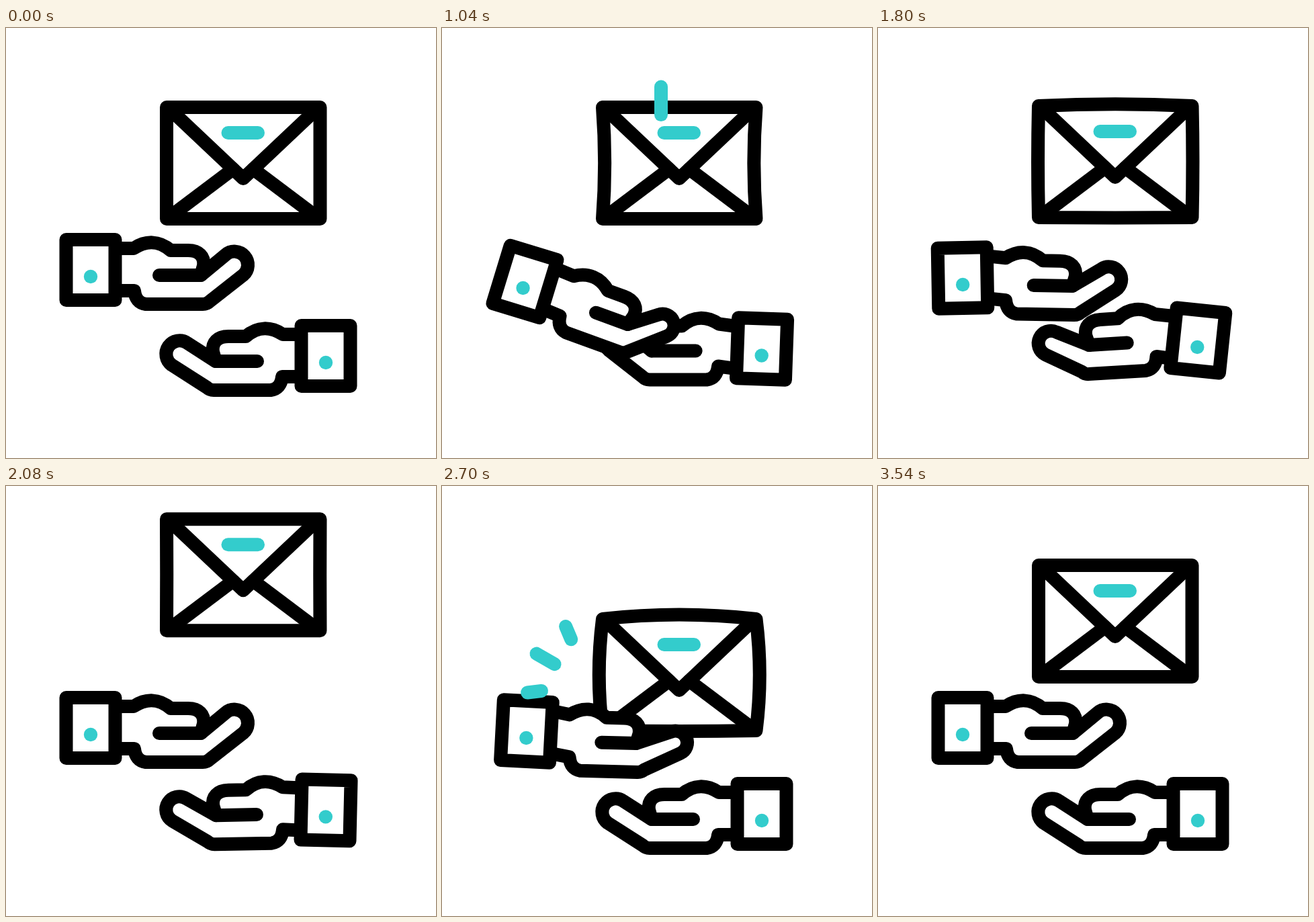
Recreate the animation shown at these times as an HTML page with a canvas. Size 640 by 640 pixels, loop 3600 ms.

```html
<!DOCTYPE html>
<html lang="en">
<head>
<meta charset="utf-8">
<title>Tossed letter</title>
<style>
  html, body { margin: 0; width: 100%; height: 100%; overflow: hidden; background: #fff; }
  canvas { display: block; width: 640px; height: 640px; }
</style>
</head>
<body>
<canvas id="stage" width="640" height="640"></canvas>
<script>
const LOOP = 3600, STEP = 20, TEAL = '#33cccc';
const ctx = document.getElementById('stage').getContext('2d');

// Key poses: time, cuff dy, cuff tilt, palm dy, palm bend, finger curl; omitted values are at rest
const LEFT = [
  [200],
  [560, -68.5, -26.5, -88, -3, 21],
  [1040, 17.5, 17, 73, 20, 19],
  [1500, 25, 8, 47, 7, 14],
  [1800, 12, -1, 16, 1, 7],
  [2080],
  [2360, 5.5, -2, 6.5],
  [2700, 5, 3, 15, 1.5, 17],
  [3060, -25, -14, -28, -3, 12],
  [3440]
];
const RIGHT = [
  [440],
  [720, 11, 3, 14, 1],
  [1040, -10.5, -2, -15.5, 0, -6],
  [1300, -31, -12, -33, 1, 5],
  [1800, -23, -6, -24, 3.5, 9],
  [2240]
];

// Envelope height: rest, catch and throw, two falls, settle
const FLIGHT = [
  [200, 0], [390, 25], [560, -33], [768, -78], [1040, 0], [1210, 112], [1340, 138],
  [1800, -2], [2067, -69], [2360, 12], [2580, 90], [2700, 80], [3200, -36], [3540, 0]
];

const rad = deg => deg * Math.PI / 180;
const clamp = p => Math.min(1, Math.max(0, p));
const smooth = p => { p = clamp(p); return p * p * (3 - 2 * p); };
const pulse = (t, from, to) => Math.sin(Math.PI * clamp((t - from) / (to - from)));

// Monotone spline through one column of the keys, held at both ends
function sample(keys, t, col = 1) {
  const last = keys.length - 1;
  const at = k => keys[k][col] || 0;
  if (t <= keys[0][0]) return at(0);
  if (t >= keys[last][0]) return at(last);
  const span = k => keys[k + 1][0] - keys[k][0];
  const slope = k => (at(k + 1) - at(k)) / span(k);
  const tangent = k => {
    if (k === 0 || k === last) return 0;
    const a = slope(k - 1), b = slope(k);
    return a * b <= 0 ? 0 : (a * span(k) + b * span(k - 1)) / (span(k - 1) + span(k));
  };
  const i = keys.findIndex(k => k[0] > t) - 1;
  const u = (t - keys[i][0]) / span(i), w = 1 - u;
  return at(i) + (at(i + 1) - at(i)) * smooth(u)
    + span(i) * u * w * (tangent(i) * w - tangent(i + 1) * u);
}

// Maps local coordinates to the stage
function frame(x, y, deg) {
  const c = Math.cos(rad(deg)), s = Math.sin(rad(deg));
  return (px, py) => [x + px * c - py * s, y + px * s + py * c];
}

function line(color, ...pts) {
  ctx.strokeStyle = color;
  ctx.beginPath();
  pts.forEach(p => ctx.lineTo(...p));
  ctx.stroke();
}

function paint() {
  ctx.fillStyle = '#fff';
  ctx.strokeStyle = '#000';
  ctx.fill();
  ctx.stroke();
}

function drawEnvelope(t) {
  const l = 239, r = 467.5, top = 118, low = 284, mx = 353, my = 201;
  const speed = Math.abs(sample(FLIGHT, t + 10) - sample(FLIGHT, t - 10)) / 20;
  const squash = pulse(t, 1210, 1900) + pulse(t, 2470, 2900);
  const side = 6 * speed - 6 * squash, bow = 6.5 * squash;

  ctx.save();
  ctx.translate(0, sample(FLIGHT, t));
  ctx.beginPath();
  ctx.moveTo(l, top);
  ctx.quadraticCurveTo(mx, top - 2 * bow, r, top);
  ctx.quadraticCurveTo(r - 2 * side, my, r, low);
  ctx.quadraticCurveTo(mx, low + bow / 3, l, low);
  ctx.quadraticCurveTo(l + 2 * side, my, l, top);
  ctx.closePath();
  paint();
  line('#000', [245, 122], [mx, 224], [461, 122]);
  line('#000', [338, 210], [245, 280]);
  line('#000', [368, 210], [461, 280]);
  line(TEAL, [330.5, 156], [375, 156]);
  ctx.restore();
}

function drawHand(keys, t, restAim) {
  const [cuffY, tilt, palmY, bend, curl] = [1, 2, 3, 4, 5].map(col => sample(keys, t, col));
  const pull = -tilt * tilt / 115;
  const cuff = frame(126 + pull, 360 + cuffY, tilt);
  const palm = frame(290 + pull - .55 * Math.abs(bend), 368 + palmY, bend);
  const aim = restAim + curl, r = 20 - .15 * Math.max(0, curl);
  const tip = frame(...palm(7, 22), aim)(57, 0);
  const to = p => ctx.lineTo(...p);
  const curve = (a, b, c) => ctx.bezierCurveTo(...a, ...b, ...c);

  ctx.beginPath();
  ctx.moveTo(...cuff(37, -32));
  to(palm(-100, -40));
  curve(palm(-82, -52), palm(-62, -52), palm(-45, -37));
  to(palm(-19, -37));
  curve(palm(-3, -37), palm(6, -28), palm(4, -14));
  to(palm(0, 0));
  ctx.arc(...tip, r, rad(aim - 90), rad(aim + 90));
  to(palm(13, 39));
  ctx.quadraticCurveTo(...palm(9, 43), ...palm(3, 43));
  to(palm(-82, 43));
  ctx.quadraticCurveTo(...palm(-97, 41), ...palm(-99, 23));
  to(cuff(37, 31));
  paint();
  line('#000', palm(0, 0), palm(.6 * curl - 62, 0));

  ctx.beginPath();
  [[-1, -1], [1, -1], [1, 1], [-1, 1]].forEach(([x, y]) => to(cuff(36.5 * x, 45 * y)));
  ctx.closePath();
  paint();
  ctx.fillStyle = TEAL;
  ctx.beginPath();
  ctx.arc(...cuff(0, 10), 10.2, 0, 2 * Math.PI);
  ctx.fill();
}

// A dash running outward along a ray between two distances
function spark(x, y, deg, from, to, head, tail) {
  if (head <= 0 || tail >= 1) return;
  const ray = frame(x, y, deg);
  line(TEAL, ray(from + (to - from) * tail, 0), ray(from + (to - from) * head, 0));
}

function drawSparks(t) {
  spark(326, 198, -90, 62, 150, smooth((t - 960) / 150), smooth((t - 990) / 290));
  const head = smooth((t - 2580) / 150), tail = smooth((t - 2640) / 180);
  for (const i of [-1, 0, 1]) {
    spark(221, 296, 210 + 37 * i, i ? 65 : 49, 98, head, tail);
  }
}

function render(now) {
  const t = Math.floor(now % LOOP / STEP) * STEP;
  ctx.fillStyle = '#fff';
  ctx.fillRect(0, 0, 640, 640);
  ctx.lineWidth = 20;
  ctx.lineCap = ctx.lineJoin = 'round';
  drawEnvelope(t);
  ctx.save();
  ctx.translate(602, 128);
  ctx.scale(-1, 1);
  drawHand(RIGHT, t, -35);
  ctx.restore();
  drawHand(LEFT, t, -41);
  drawSparks(t);
}

function tick() {
  render(performance.now());
  requestAnimationFrame(tick);
}
tick();
</script>
</body>
</html>
```
